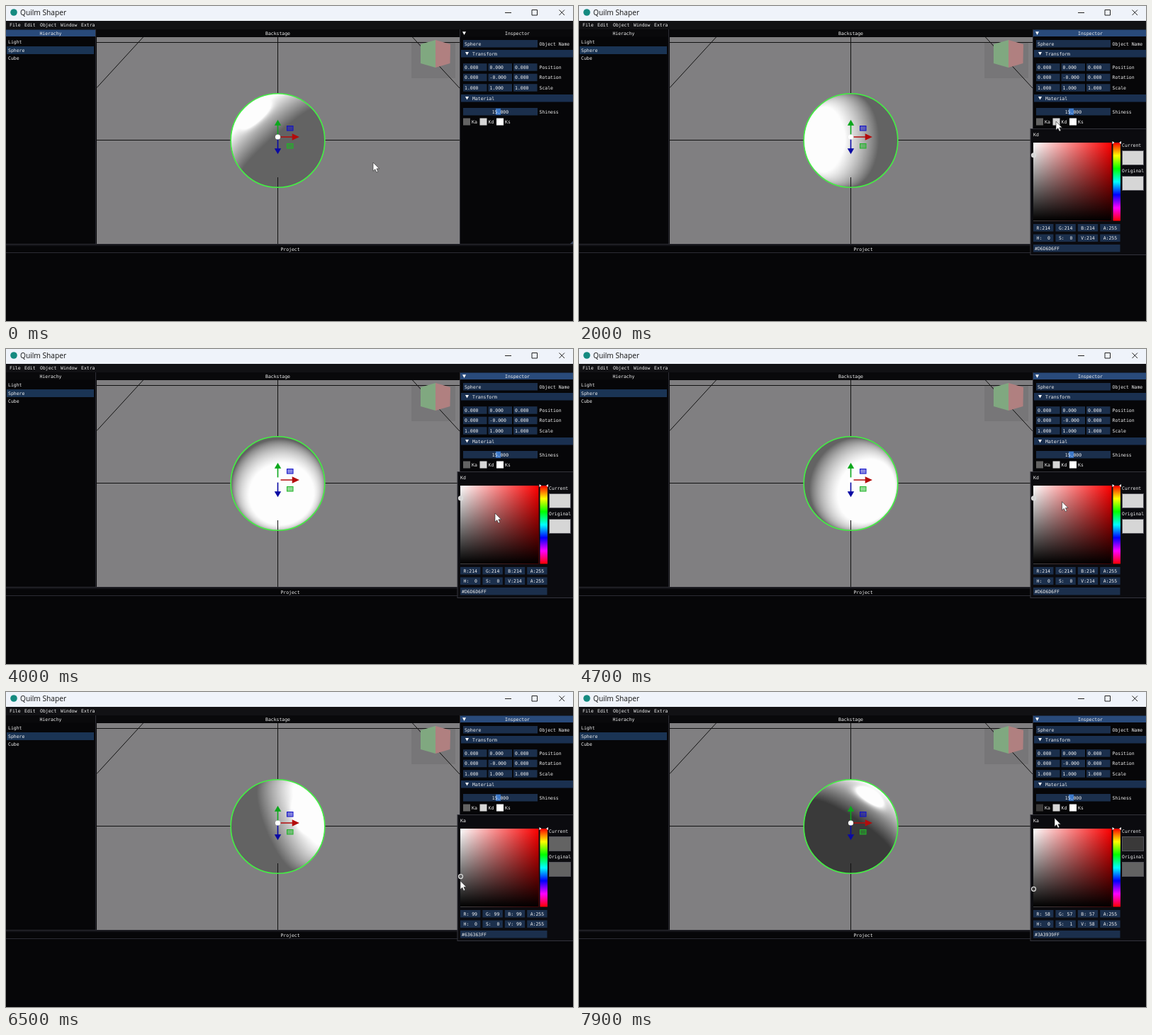
An HTML page with a canvas for the animation above (8000 ms loop, 800 by 445 pixels).

```html
<!DOCTYPE html>
<html lang="en">
<head>
<meta charset="utf-8">
<title>Sphere shading</title>
<style>
html, body { margin: 0; width: 100%; height: 100%; overflow: hidden; background: #060608; }
canvas, svg { position: absolute; left: 0; top: 0; display: block; }
text { font: 6.45px "DejaVu Sans Mono", monospace; fill: #f2f2f2; white-space: pre; }
.title { font: 10.2px "Open Sans", sans-serif; fill: #111; }
</style>
</head>
<body>
<canvas id="view" width="800" height="445"></canvas>
<svg id="ui" width="800" height="445" viewBox="0 0 800 445">
  <defs>
    <linearGradient id="sat"><stop stop-color="#fff"/><stop offset="1" stop-color="#f00"/></linearGradient>
    <linearGradient id="val" x2="0" y2="1"><stop stop-color="#000" stop-opacity="0"/><stop offset="1"/></linearGradient>
    <linearGradient id="hue" x2="0" y2="1"></linearGradient>
  </defs>
</svg>
<script>
const LOOP = 8000, STEP = 100;
const CX = 383.5, CY = 190, R = 66;
const FIELD = '#1b2f4c', ACTIVE = '#294a7a', IDLE = '#09090b', EDGE = '#2c2c34';
const ui = document.getElementById('ui');
const ctx = document.getElementById('view').getContext('2d');

function add(tag, attrs, parent = ui) {
  const el = document.createElementNS('http://www.w3.org/2000/svg', tag);
  for (const key in attrs) el.setAttribute(key, attrs[key]);
  parent.appendChild(el);
  return el;
}
const box = (x, y, width, height, fill, parent, extra) => add('rect', { x, y, width, height, fill, ...extra }, parent);
const path = (d, fill, parent, extra) => add('path', { d, fill, ...extra }, parent);
// Labels are placed by their vertical middle.
function label(x, y, str, parent, anchor = 'start') {
  const el = add('text', { x, y: y + 2.3, 'text-anchor': anchor }, parent);
  el.textContent = str;
  return el;
}
function field(x, y, w, str, parent) {
  box(x, y, w, 10.5, FIELD, parent);
  return label(x + w / 2, y + 5.2, str, parent, 'middle');
}

// Window frame and menu
box(0, 0, 800, 21, '#eff3fa');
add('circle', { cx: 11, cy: 9, r: 4.8, fill: '#148a80' });
const title = add('text', { x: 20, y: 13, class: 'title' });
title.textContent = 'Quilm Shaper';
path('M704 9.5H713M742 5.5H749.5V13H742ZM780.5 5.5L788 13M788 5.5L780.5 13', 'none', ui, { stroke: '#222', 'stroke-width': 1 });
box(0, 21, 800, 12.5, '#111114');
[[5, 'File'], [26, 'Edit'], [48, 'Object'], [77, 'Window'], [106, 'Extra']].forEach(([x, s]) => label(x, 27, s));

// Panels
box(0, 33.5, 800, 10, IDLE);
const treeBar = box(0, 33.5, 126, 9.5, ACTIVE);
const inspectorBar = box(641, 33.5, 159, 9.5, IDLE);
path('M126.5 33V336M640.5 33V336M0 336.5H800M0 348.5H800', 'none', ui, { stroke: EDGE });
box(0, 337.5, 800, 1.5, '#16161b');
label(63, 38.5, 'Hierachy', ui, 'middle');
label(383.5, 38.5, 'Backstage', ui, 'middle');
label(721.5, 38.5, 'Inspector', ui, 'middle');
label(401, 344, 'Project', ui, 'middle');
const triangle = (x, y) => path(`M${x} ${y}h5l-2.5 4.6Z`, '#fff');
triangle(644, 36.3);
path('M800 332V336H796Z', '#34425a');

box(1, 57, 123, 11, '#1a3454');
['Light', 'Sphere', 'Cube'].forEach((s, i) => label(3, 51 + i * 11.4, s));

// Inspector
box(645, 48, 105, 10.5, FIELD);
label(647, 53.2, 'Sphere');
label(752.5, 53.2, 'Object Name');
[[62, 'Transform'], [125, 'Material']].forEach(([y, s]) => {
  box(642, y, 158, 10.5, '#1a3050');
  triangle(648, y + 3);
  label(658, y + 5.3, s);
});
[['Position', '0.000', '0.000'], ['Rotation', '0.000', '-0.000'], ['Scale', '1.000', '1.000']].forEach(([name, a, b], row) => {
  const y = 81.2 + row * 14.5;
  [a, b, a].forEach((s, i) => {
    box(645 + i * 35.5, y, 33.5, 10.5, FIELD);
    label(647 + i * 35.5, y + 5.2, s);
  });
  label(752.5, y + 5.2, name);
});
box(645, 144, 105, 10.5, FIELD);
box(691, 144.8, 7, 9, '#3d78c8');
label(697.5, 149.2, '15.000', ui, 'middle');
label(752.5, 149.2, 'Shiness');
const swatches = [['Ka', '#636363'], ['Kd', '#d6d6d6'], ['Ks', '#fff']].map(([s, fill], i) => {
  label(657 + i * 23.5, 163.5, s);
  return box(645 + i * 23.5, 158.5, 10, 10, fill);
});

// Orientation cube and move gizmo
box(572, 52, 62, 50, '#000', ui, { opacity: .07 });
path('M585 54L606 48V87L585 81Z', '#80a880');
path('M606 48L627 54L626.5 81L606 87Z', '#b08080');
function arrow(color, turn) {
  path('M4 0H22M21 -3.5L28.5 0L21 3.5Z', color, ui,
    { stroke: color, 'stroke-width': 1.6, 'stroke-linejoin': 'miter', transform: `translate(${CX} 185) rotate(${turn}) scale(${turn ? .8 : 1},1)` });
}
arrow('#b40c0c', 0);
arrow('#0ca81c', -90);
arrow('#0a0aa4', 90);
add('circle', { cx: CX, cy: 185, r: 3.6, fill: '#fff' });
[[169.5, '#1010c8'], [194.5, '#20b428']].forEach(([y, color]) =>
  box(396.5, y, 8.5, 6.5, color, ui, { stroke: color, 'fill-opacity': .5 }));

// Colour picker
const popup = add('g', {});
box(637, 173.5, 170, 178, '#0b0b0f', popup, { stroke: '#34343c' });
const popupName = label(641, 181.5, '', popup);
box(641, 193, 110.5, 110.5, 'url(#sat)', popup);
box(641, 193, 110.5, 110.5, 'url(#val)', popup);
const hue = document.getElementById('hue');
for (let i = 0; i <= 6; i++) add('stop', { offset: i / 6, 'stop-color': `hsl(${i * 60},100%,50%)` }, hue);
box(753.5, 193, 10.5, 110.5, 'url(#hue)', popup);
path('M752.5 191L755.5 193L752.5 195ZM765 191L762 193L765 195Z', '#fff', popup);
label(766, 197, 'Current', popup);
label(766, 233, 'Original', popup);
const current = box(766.5, 204.5, 30, 20, '', popup, { stroke: '#55555c' });
const initial = box(766.5, 240.5, 30, 20, '', popup, { stroke: '#55555c' });
const channels = [308, 322.5].map(y => [0, 1, 2, 3].map(i => field(641 + i * 31.4, y, 28.4, '', popup)));
box(641, 337, 122.5, 10.5, FIELD, popup);
const hex = label(643, 342.2, '', popup);
const knob = add('circle', { cx: 641.5, r: 3, stroke: '#ddd', 'stroke-width': 1.2 }, popup);

const pointer = path('M0 0V12.2L2.8 9.6L4.8 14L6.8 13.1L4.9 8.8H8.6Z', '#fff', ui, { stroke: '#222', 'stroke-width': .6 });

const route = [
  [0, 518, 221], [700, 768, 200], [1200, 772, 166], [1800, 673, 163], [2150, 673, 163],
  [2700, 688, 236], [3100, 689, 236], [4000, 690, 232], [4500, 689, 228], [5200, 651, 166], [5700, 651, 166],
  [6400, 641, 267], [6700, 641, 266], [7300, 641, 261], [7600, 641, 279], [7900, 671, 178], [8000, 680, 172]
];
function along(t) {
  const i = Math.max(1, route.findIndex(k => k[0] > t));
  const [a, b] = [route[i - 1], route[i]];
  const u = (t - a[0]) / (b[0] - a[0]), e = u * u * (3 - 2 * u);
  return [1, 2].map(k => a[k] + (b[k] - a[k]) * e);
}

const ball = document.createElement('canvas');
const size = ball.width = ball.height = 2 * R + 2;
const ballCtx = ball.getContext('2d');
const pixels = ballCtx.createImageData(size, size);

// Phong sphere; the lamp circles a vertical axis seen from 45 degrees above.
function shade(t, ambient) {
  const angle = (223 - 35 * t / 1000) * Math.PI / 180;
  const height = .5, len = Math.hypot(1, height), tilt = Math.SQRT1_2;
  const lx = Math.cos(angle) / len;
  const ly = (height - Math.sin(angle)) * tilt / len;
  const lz = (height + Math.sin(angle)) * tilt / len;
  for (let j = 0; j < size; j++) for (let i = 0; i < size; i++) {
    const x = (i + .5 - size / 2) / R, y = (size / 2 - j - .5) / R, rr = x * x + y * y;
    const at = 4 * (j * size + i);
    if (rr > 1.01) { pixels.data[at + 3] = 0; continue; }
    const z = Math.sqrt(Math.max(0, 1 - rr));
    const lit = x * lx + y * ly + z * lz;
    const shine = lit > 0 ? Math.max(0, 2 * lit * z - lz) ** 15 : 0;
    const v = ambient + 214 * Math.max(0, lit) + 255 * shine;
    pixels.data[at] = pixels.data[at + 1] = pixels.data[at + 2] = Math.min(253, v);
    pixels.data[at + 3] = 255;
  }
  ballCtx.putImageData(pixels, 0, 0);
}

function lines(...segments) {
  ctx.beginPath();
  segments.forEach(([x1, y1, x2, y2]) => { ctx.moveTo(x1, y1); ctx.lineTo(x2, y2); });
  ctx.stroke();
}
function drawView(t, ambient) {
  ctx.fillStyle = '#807f81';
  ctx.fillRect(128, 44, 512, 292);
  ctx.strokeStyle = '#111';
  ctx.lineWidth = 1;
  lines([128, 51.5, 640, 51.5], [128, 189.5, 640, 189.5], [CX, 44, CX, 336], [193.5, 44, 128, 115.5], [573.5, 44, 640, 116]);
  shade(t, ambient);
  ctx.drawImage(ball, CX - size / 2, CY - size / 2);
  lines([CX, 242, CX, 258]);
  ctx.strokeStyle = '#43f043';
  ctx.lineWidth = 1.6;
  ctx.beginPath();
  ctx.arc(CX, CY, R + .3, 0, 7);
  ctx.stroke();
}

const pad = n => String(n).padStart(3);
function drawPicker(t, ambient) {
  const isKd = t < 4900;
  const open = t >= 1900 && t < 4900 || t >= 5600;
  popup.setAttribute('display', open ? 'inline' : 'none');
  const v = isKd ? 214 : ambient, tinted = v < 99 ? 1 : 0, low = v - tinted;
  const code = '#' + [v, low, low].map(n => n.toString(16).padStart(2, '0')).join('').toUpperCase();
  popupName.textContent = isKd ? 'Kd' : 'Ka';
  current.setAttribute('fill', code);
  initial.setAttribute('fill', isKd ? '#d6d6d6' : '#636363');
  knob.setAttribute('fill', code);
  knob.setAttribute('cy', 193 + 110.5 * (1 - v / 255));
  hex.textContent = code + 'FF';
  [['R', v, 'G', low, 'B', low], ['H', 0, 'S', tinted, 'V', v]].forEach((row, r) => {
    for (let i = 0; i < 3; i++) channels[r][i].textContent = row[2 * i] + ':' + pad(row[2 * i + 1]);
    channels[r][3].textContent = 'A:255';
  });
  swatches[0].setAttribute('fill', isKd ? '#636363' : code);
}

function render(t) {
  const drag = Math.min(1, Math.max(0, (t - 7300) / 300));
  const ambient = Math.round(99 - 41 * drag * drag * (3 - 2 * drag));
  drawView(t, ambient);
  drawPicker(t, ambient);
  treeBar.setAttribute('fill', t < 1900 ? ACTIVE : IDLE);
  inspectorBar.setAttribute('fill', t < 1900 ? IDLE : ACTIVE);
  pointer.setAttribute('transform', `translate(${along(t)})`);
}

const start = performance.now();
function tick() {
  const t = (performance.now() - start) % LOOP;
  render(Math.floor(t / STEP) * STEP);
  requestAnimationFrame(tick);
}
tick();
</script>
</body>
</html>
```
